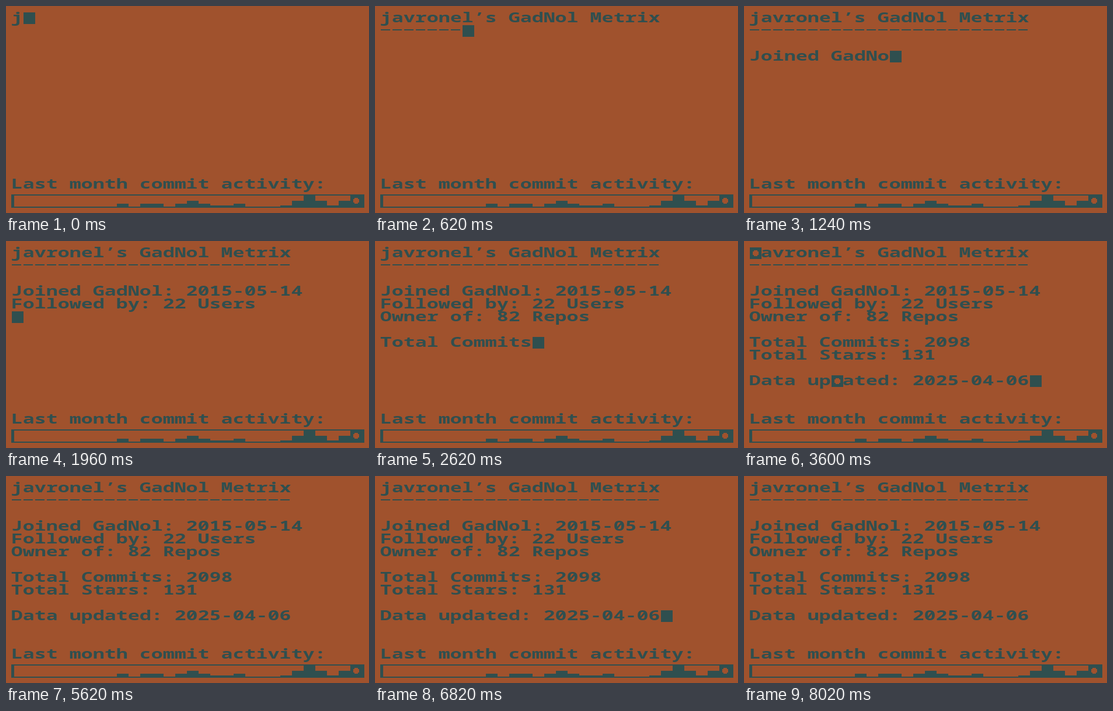
These frames come from a looping animation (622x356 px, 8.42 s). An HTML page:

```html
<!DOCTYPE html>
<html lang="en">
<head>
<meta charset="utf-8">
<title>Commit terminal</title>
<style>
  html, body { margin: 0; width: 100%; height: 100%; overflow: hidden; background: #a0522d; }
  svg { display: block; width: 622px; height: 356px; fill: #2f4f4f; }
  text { font: 600 24px "Noto Sans Mono", "DejaVu Sans Mono", monospace; white-space: pre; }
  .hole { fill: #a0522d; }
  rect, line, path { shape-rendering: crispEdges; }
</style>
</head>
<body>
<svg viewBox="0 0 622 356">
  <defs>
    <g id="dot">
      <rect width="20" height="20"/>
      <path class="hole" d="M7 5h6v2h2v6h-2v2h-6v-2h-2v-6h2z"/>
    </g>
  </defs>
  <g id="rows"></g>
  <line id="rule" x1="10" y1="41" y2="41" stroke="#2f4f4f" stroke-width="2" stroke-dasharray="16 4"/>
  <rect id="cursor" width="20" height="20"/>
  <g id="marks">
    <use href="#dot" x="10" y="11"/>
    <use href="#dot" x="150" y="231"/>
  </g>
  <path fill-rule="evenodd" d="M9 324H614V347H9zM14 326V345H609V326z"/>
  <g id="bars"></g>
  <use href="#dot" x="590" y="325"/>
</svg>
<script>
const LOOP = 8420, STEP = 20, CELL = 20, LINE = 22, LEFT = 10, TOP = 11;
const BLINK = 400, TYPED = 3600, RULE_ROW = 1, DATE_ROW = 10;

const copy = [
  "javronel’s GadNol Metrix",
  "-".repeat(24),
  "",
  "Joined GadNol: 2015-05-14",
  "Followed by: 22 Users",
  "Owner of: 82 Repos",
  "",
  "Total Commits: 2098",
  "Total Stars: 131",
  "",
  "Data updated: 2025-04-06"
];
const script = copy.join("\n");

const $ = id => document.getElementById(id);
const add = (parent, tag, attrs) => {
  const el = document.createElementNS("http://www.w3.org/2000/svg", tag);
  for (const k in attrs) el.setAttribute(k, attrs[k]);
  return parent.appendChild(el);
};

// One wide terminal cell is 20px; the font advances 0.6em = 14.4px.
const addRow = row => add($("rows"), "text", {
  transform: `translate(${LEFT - 1.25} ${TOP + 16.5 + LINE * row}) scale(${CELL / 14.4} 1)`
});
const rows = copy.map((_, i) => addRow(i));
addRow(13).textContent = "Last month commit activity:";

// Daily bar heights in eighths of a cell.
[..."000000000202202421120001484140"].forEach((eighths, i) => {
  const height = Math.floor(eighths * CELL / 8);
  if (height) add($("bars"), "rect", { x: LEFT + CELL * i, y: 345 - height, width: CELL, height });
});

const blank = (s, i) => s.slice(0, i) + " " + s.slice(i + 1);

function draw(t) {
  const shown = script.slice(0, Math.floor(t / STEP) + 1).split("\n");
  const last = shown.length - 1;
  const marked = t >= TYPED && t < 4420;
  const off = t >= 4020 && Math.floor((t - 4020) / BLINK) % 2 === 0;

  rows.forEach((el, i) => {
    let s = i === RULE_ROW ? "" : shown[i] || "";
    if (marked && i === 0) s = blank(s, 0);
    if (marked && i === DATE_ROW) s = blank(s, 7);
    if (el.textContent !== s) el.textContent = s;
  });
  $("rule").setAttribute("x2", LEFT + CELL * (shown[RULE_ROW] || "").length);
  $("cursor").setAttribute("x", LEFT + CELL * shown[last].length);
  $("cursor").setAttribute("y", TOP + LINE * last);
  $("cursor").style.visibility = off ? "hidden" : "visible";
  $("marks").style.visibility = marked ? "visible" : "hidden";
}

function tick() {
  draw(performance.now() % LOOP);
  requestAnimationFrame(tick);
}
tick();
</script>
</body>
</html>
```
